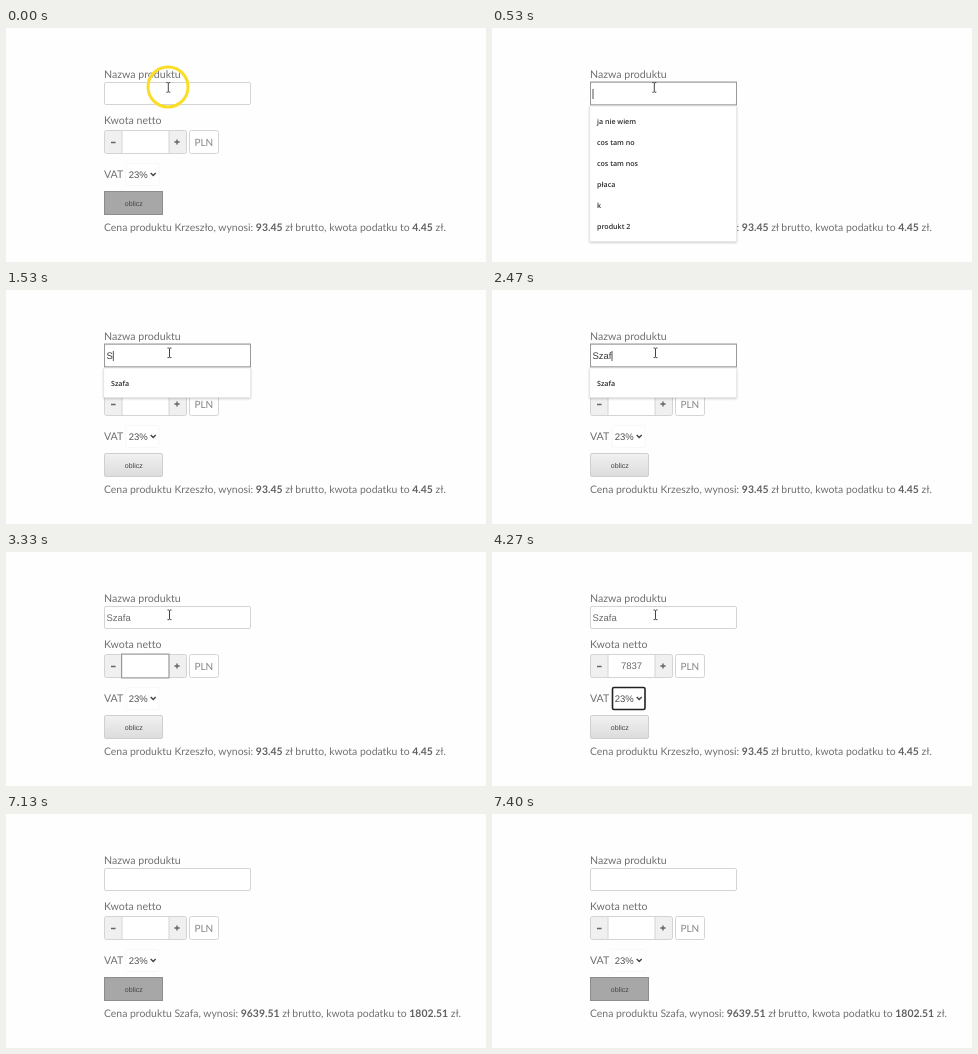
Animation of 480 by 234 pixels, one loop 8000 ms. Source, as an HTML page:

```html
<!DOCTYPE html>
<html lang="pl">
<head>
<meta charset="utf-8">
<title>Kalkulator VAT</title>
<style>
  html, body { margin: 0; width: 100%; height: 100%; overflow: hidden; background: #fefefe; }
  svg { display: block; width: 100%; height: 100%; }
  text {
    font: 10.6px Lato, sans-serif; fill: #707070; white-space: pre;
    font-variant-ligatures: none; text-rendering: geometricPrecision;
  }
  .result { font-size: 10.42px; }
  .bold { font-weight: 700; fill: #606060; }
  .unit { font-size: 10px; fill: #858585; }
  .field { font: 9.5px "Liberation Sans", Arial, sans-serif; fill: #6a6a6a; }
  .small { font: 7px "Liberation Sans", Arial, sans-serif; fill: #444; }
  .list text { font: 600 7.1px "Open Sans", "Noto Sans", sans-serif; fill: #2a2a2a; }
  .list rect { fill: #fff; stroke: #e6e6e6; stroke-width: .7; filter: drop-shadow(0 1px 1px #0003); }
  .box { fill: #fff; stroke: #d4d4d4; }
  .focus { fill: none; stroke: #999; }
  .mid { text-anchor: middle; }
</style>
</head>
<body>
<svg viewBox="0 0 480 234">
  <defs>
    <linearGradient id="shade" x2="0" y2="1">
      <stop stop-color="#f1f1f1"/><stop offset="1" stop-color="#dcdcdc"/>
    </linearGradient>
  </defs>

  <text x="98" y="49.8">Nazwa produktu</text>
  <rect class="box" x="98.5" y="54.5" width="146" height="22" rx="1.5"/>
  <rect class="focus" id="nameFocus" x="98.5" y="54" width="146" height="23"/>
  <text class="field" id="name" x="100.5" y="68.8"></text>

  <text x="98" y="95.7">Kwota netto</text>
  <rect class="box" x="98.5" y="102.5" width="82" height="23" rx="2" style="fill:#f0f0f0"/>
  <rect class="box" x="116" y="102.5" width="47" height="23"/>
  <path d="M105 114.5h4.6M168.4 114h5.2M171 111.4v5.2" stroke="#666" stroke-width="1.4"/>
  <rect class="focus" id="netFocus" x="115.5" y="102" width="47.5" height="24"/>
  <text class="field mid" id="net" x="139.5" y="117.3"></text>
  <rect class="box" x="183.5" y="102.5" width="29" height="23" rx="2"/>
  <text class="unit mid" x="197.8" y="117.6">PLN</text>

  <text x="98" y="150.3">VAT</text>
  <rect x="120" y="135.5" width="33" height="22" rx="2" fill="#fff" stroke="#f8f8f8"/>
  <rect id="vatFocus" x="120.5" y="135.5" width="32.5" height="22" rx="1.5" fill="none" stroke="#222" stroke-width="1.6"/>
  <text class="field" x="122.8" y="149.6" style="fill:#505050">23%</text>
  <path d="M144.7 145l2.5 2.5 2.5-2.5" fill="none" stroke="#444" stroke-width="1.4"/>

  <rect id="button" x="98.5" y="163.5" width="58" height="23"/>
  <text class="small mid" x="127.8" y="178.1">oblicz</text>

  <text class="result" x="98" y="202.7">Cena produktu <tspan id="product"></tspan>, wynosi: <tspan class="bold" id="gross"></tspan> zł brutto, kwota podatku to <tspan class="bold" id="tax"></tspan> zł.</text>

  <g class="list" id="found">
    <rect x="97.8" y="78" width="146.7" height="29.5"/><text x="105" y="95.7">Szafa</text>
  </g>
  <g class="list" id="all"><rect x="97.8" y="78" width="146.7" height="135.5"/></g>
  <g class="list" id="sums"><rect x="115.5" y="126.5" width="112" height="52"/></g>

  <rect id="caret" width="1" height="10" fill="#555"/>
  <circle id="ring" cx="162" cy="59" r="20" fill="none" stroke="#fbdc26" stroke-width="3"/>
  <path id="cursor" d="M-2-4.7h1.4l.6.5.6-.5h1.4M0-4.2v8.6M-2 4.9h1.4l.6-.5.6.5h1.4" fill="none" stroke="#444" stroke-width="1"/>
</svg>
<script>
const LOOP = 8000;
const $ = id => document.getElementById(id);
const show = (id, alpha) => $(id).setAttribute('opacity', +alpha);
const write = (id, text) => { $(id).textContent = text; };
const clamp = x => Math.max(0, Math.min(1, x));

// Value of the last [time, value] pair already reached
const at = (t, steps) => steps.reduce((now, [start, value]) => t >= start ? value : now, '');

['ja nie wiem', 'cos tam no', 'cos tam nos', 'płaca', 'k', 'produkt 2'].forEach((label, i) => {
  const item = document.createElementNS('http://www.w3.org/2000/svg', 'text');
  item.setAttribute('x', 105);
  item.setAttribute('y', 95.7 + 21 * i);
  item.textContent = label;
  $('all').append(item);
});

function draw(t) {
  const focus = at(t, [[0, 'button'], [70, 'name'], [2730, 'net'], [4270, 'vat'], [5470, 'button']]);
  const inName = focus === 'name';
  const done = t >= 5870;

  write('name', at(t, [[1470, 'S'], [1730, 'Sz'], [1930, 'Sza'], [2470, 'Szaf'], [2530, 'Szafa'], [5870, '']]));
  write('net', at(t, [[3730, '7'], [3870, '78'], [3930, '783'], [4070, '7837'], [5870, '']]));
  write('product', done ? 'Szafa' : 'Krzeszło');
  write('gross', done ? '9639.51' : '93.45');
  write('tax', done ? '1802.51' : '4.45');

  for (const id of ['name', 'net', 'vat']) show(id + 'Focus', focus === id);
  $('name').style.fill = inName ? '#3a3a3a' : '';
  const pressed = focus === 'button';
  $('button').setAttribute('fill', pressed ? '#a7a7a7' : 'url(#shade)');
  $('button').setAttribute('stroke', pressed ? '#8c8c8c' : '#cfcfcf');
  $('button').setAttribute('rx', pressed ? 0 : 1.5);

  show('all', at(t, [[0, 0], [200, .5], [330, 1], [1470, .5], [1530, 0]]));
  show('found', t >= 1530 && t < 2530);
  show('sums', t >= 3730 && t < 3870);

  const blink = (t >= 770 && t < 1270) || (t >= 3330 && t < 3730);
  show('caret', (inName || focus === 'net') && !blink);
  $('caret').setAttribute('x', inName
    ? 100.5 + $('name').getComputedTextLength()
    : 139 + $('net').getComputedTextLength() / 2);
  $('caret').setAttribute('y', inName ? 61 : 109.5);

  show('ring', at(t, [[0, 1], [70, .7], [200, .35], [330, 0]]));
  const move = clamp((t - 530) / 600);
  $('cursor').setAttribute('transform', `translate(${162.3 + 1.2 * move} ${59.3 + 3.4 * move})`);
  show('cursor', t < 7130);
}

const start = performance.now();
function tick() {
  draw((performance.now() - start) % LOOP);
  requestAnimationFrame(tick);
}
tick();
</script>
</body>
</html>
```
